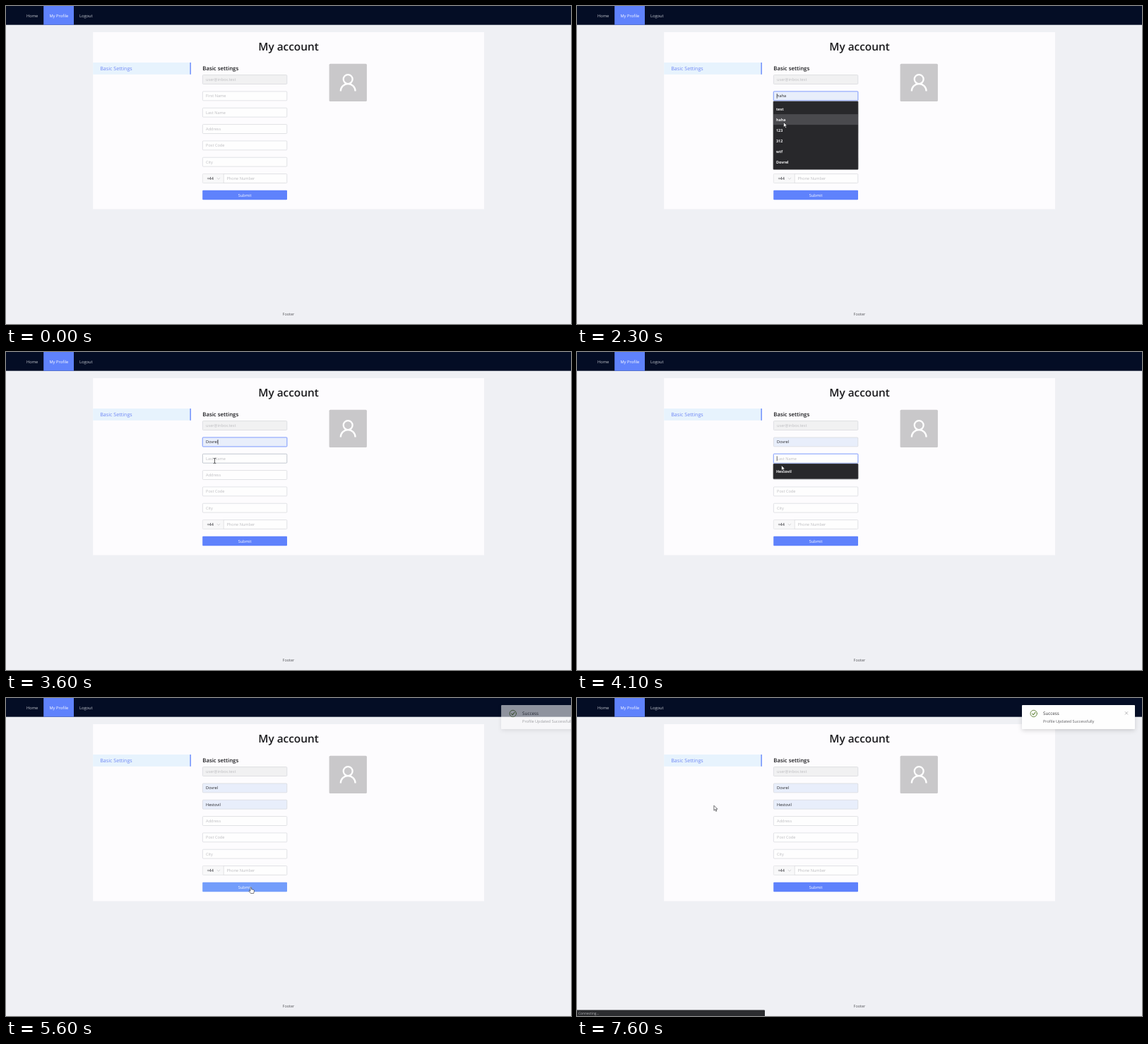
Write an HTML page that moves like this. It is 800 px wide and 450 px high and loops after 8000 ms.

```html
<!DOCTYPE html>
<html lang="en">
<head>
<meta charset="utf-8">
<title>My account</title>
<style>
  html, body { margin: 0; width: 100%; height: 100%; overflow: hidden; background: #eff0f4; }
  svg { display: block; width: 100vw; height: 100vh; }
  text {
    font-family: "Open Sans", "Noto Sans", sans-serif;
    font-size: 5.6px;
    text-rendering: geometricPrecision;
    white-space: pre;
  }
  .nav { font-size: 5.75px; fill: #c3c7cf; }
  .mid { text-anchor: middle; }
  .semi { font-weight: 600; fill: #1b1b1e; }
  .hint { fill: #bdbdc0; }
  .dark { fill: #232327; }
  .item { font-size: 5.4px; font-weight: 700; fill: #f4f4f5; }
  .line { fill: none; stroke-linecap: round; stroke-linejoin: round; }
</style>
</head>
<body>
<svg id="stage" viewBox="0 0 800 450" preserveAspectRatio="none">
  <defs>
    <filter id="soft" x="-20%" y="-50%" width="140%" height="220%">
      <feDropShadow dx="0" dy="2" stdDeviation="3" flood-color="#000" flood-opacity=".16"/>
    </filter>
  </defs>

  <rect width="800" height="450" fill="#eff0f4"/>
  <rect width="800" height="26.7" fill="#040d25"/>
  <rect x="53.2" width="42.8" height="26.7" fill="#5f82fc"/>
  <text class="nav" x="29" y="15.6">Home</text>
  <text class="nav" x="61.4" y="15.6" style="fill:#fff">My Profile</text>
  <text class="nav" x="104" y="15.6">Logout</text>

  <rect x="123.2" y="37" width="553.7" height="250.5" fill="#fdfcfe"/>
  <text class="semi mid" x="400" y="62.6" style="font-size:15.4px">My account</text>
  <rect x="123.2" y="80" width="138.6" height="16.8" fill="#e7f3fd"/>
  <rect x="260.5" y="80" width="1.3" height="16.8" fill="#5f82fc"/>
  <text x="133.2" y="91.3" fill="#6f87f5" style="font-size:7.15px">Basic Settings</text>
  <text class="semi" x="278.3" y="90.8" style="font-size:7.75px">Basic settings</text>

  <rect x="457.6" y="81.7" width="53.3" height="53.3" rx="1.6" fill="#c9c8ca"/>
  <g fill="none" stroke="#fff" stroke-width="2.3">
    <circle cx="484.2" cy="103.6" r="6.45"/>
    <path d="M473.8 120.5a10.4 10.4 0 0 1 20.8 0"/>
  </g>

  <g id="fields"></g>

  <rect id="submit" x="278.2" y="260.8" width="119.8" height="13.4" rx="1"/>
  <text class="mid" x="338.1" y="269.6" fill="#fff">Submit</text>
  <text class="mid" x="400" y="437.5" fill="#57585c" style="font-size:5.5px">Footer</text>

  <g id="lists"></g>

  <g id="toast">
    <rect x="630" y="10" width="160" height="34" rx="1" fill="#fefefe" filter="url(#soft)"/>
    <g class="line" stroke="#6c8b45">
      <circle cx="646.7" cy="22" r="4.7" stroke-width="1"/>
      <path d="M644.6 22.1l1.5 1.7 2.8-3.5" stroke-width="1.1"/>
    </g>
    <text x="660" y="24.2" fill="#37373a" style="font-size:6.3px">Success</text>
    <text x="660" y="35" fill="#5d5d61" style="font-size:5.5px">Profile Updated Successfully</text>
    <path class="line" d="M776.2 19.6l3.6 3.6m0-3.6l-3.6 3.6" stroke="#8b8b8f" stroke-width=".6"/>
  </g>

  <g id="status">
    <path d="M0 441.4h265a1 1 0 0 1 1 1V450H0z" fill="#2b2c2f"/>
    <text x="2" y="447.7" fill="#b9babd" style="font-size:4.85px">Connecting...</text>
  </g>

  <g id="arrow">
    <path d="M0 0v7l1.6-1.5 1.2 2.6 1.2-.5-1.2-2.6h2.2z" fill="#fff" stroke="#26262a" stroke-width=".65" stroke-linejoin="round"/>
  </g>
  <g id="beam">
    <path class="line" d="M-1.4-3.6Q0-3.6 0-2.8Q0-3.6 1.4-3.6M0-2.8V2.8M-1.4 3.6Q0 3.6 0 2.8Q0 3.6 1.4 3.6" stroke="#2c2c30" stroke-width=".75"/>
  </g>
  <g id="hand">
    <path d="M-.8 5V.7Q0-.4.8.7V3.2L4.1 4Q4.9 4.3 4.7 5.4L3.9 9H-.2L-2.9 5.6Q-2.5 4.2-.8 5.8z" fill="#fff" stroke="#26262a" stroke-width=".6" stroke-linejoin="round"/>
  </g>
</svg>

<script>
const LOOP = 8000, STEP = 100;
const LEFT = 278.2, WIDTH = 119.8, TOP = 97.4, PITCH = 23.33, HIGH = 13.3, ROW = 15;
const BLUE = '#5f82fc';
const FIRST = 'Dovrel', LAST = 'Hestovil';
const $ = id => document.getElementById(id);

function add(parent, tag, attrs, text) {
  const el = document.createElementNS('http://www.w3.org/2000/svg', tag);
  for (const key in attrs) el.setAttribute(key, attrs[key]);
  if (text) el.textContent = text;
  parent.appendChild(el);
  return el;
}
const set = (el, attrs) => { for (const key in attrs) el.setAttribute(key, attrs[key]); };
const show = (el, on) => { el.style.display = on ? '' : 'none'; };
const clamp = v => Math.min(1, Math.max(0, v));
const ease = v => v * v * (3 - 2 * v);

// Form fields
const labels = ['user@inbox.test', 'First Name', 'Last Name', 'Address', 'Post Code', 'City', 'Phone Number'];
const fields = labels.map((hint, i) => {
  const y = TOP + i * PITCH, phone = i === 6;
  const size = { x: LEFT + .2, y: y + .2, width: WIDTH - .4, height: HIGH - .4, rx: 1 };
  const ring = add($('fields'), 'rect', { ...size, fill: 'none', stroke: BLUE, 'stroke-opacity': .22, 'stroke-width': 2 });
  const box = add($('fields'), 'rect', { ...size, 'stroke-width': .65 });
  if (phone) {
    add($('fields'), 'rect', { x: LEFT + .5, y: y + .5, width: 29.4, height: HIGH - 1, fill: '#f8f8f9' });
    add($('fields'), 'path', { d: `M308.2 ${y + .3}v${HIGH - .6}`, stroke: '#d5d5d9', 'stroke-width': .65 });
    add($('fields'), 'text', { class: 'dark', x: 284.4, y: y + 8.7 }, '+44');
    add($('fields'), 'path', { class: 'line', d: `M299 ${y + 5.9}l1.9 2 1.9-2`, stroke: '#bcbcc0', 'stroke-width': .6 });
  }
  const text = add($('fields'), 'text', { class: 'hint', x: phone ? 312.5 : 283.1, y: y + 8.7 }, hint);
  const caret = add($('fields'), 'path', { stroke: '#17171a', 'stroke-width': .6 });
  const squiggle = add($('fields'), 'path', { stroke: '#c58d8d', 'stroke-width': .5, 'stroke-dasharray': '.8 .4' });
  return { hint, y, ring, box, text, caret, squiggle };
});

// Suggestion lists below the two name fields
function makeList(y, names) {
  const g = add($('lists'), 'g', {});
  add(g, 'rect', { x: 277.8, y, width: 120.4, height: names.length * ROW + 6.8, rx: 1, fill: '#28282b', stroke: '#77787c', 'stroke-width': .4 });
  const bar = add(g, 'rect', { x: 278, width: 120, height: ROW, fill: '#4a4a4e' });
  names.forEach((n, i) => add(g, 'text', { class: 'item', x: 282, y: y + 12.8 + i * ROW }, n));
  return { g, bar, y: y + 3.4, names };
}
const lists = [
  { ...makeList(134.7, ['test', 'haha', '123', '312', 'wtf', FIRST]), field: 1, from: 1600, to: 3200 },
  { ...makeList(158, [LAST]), field: 2, from: 3900, to: 4400 }
];

// Pointer path: time, x, y
const path = [
  [100, 683, 190], [900, 250, 146], [1000, 246, 138], [1200, 294, 126], [1300, 297, 125.5],
  [2100, 297, 126], [2300, 292.5, 164.5], [2400, 292, 168.5], [2900, 292, 217], [3200, 292, 217],
  [3500, 295, 156], [3600, 295.5, 154], [4000, 295, 153], [4200, 284, 168], [4500, 281, 169],
  [4900, 428, 254], [5000, 424, 260], [5300, 350, 267.5], [5800, 345, 267.5],
  [6150, 645, 74], [6450, 218, 97], [6600, 232.3, 104.7], [6700, 232.3, 104.7],
  [7300, 193.9, 152.2], [8000, 193.9, 152.2]
];
function pointer(t) {
  const i = Math.max(1, path.findIndex(p => p[0] >= t));
  const [t0, x0, y0] = path[i - 1], [t1, x1, y1] = path[i];
  const k = ease(clamp((t - t0) / (t1 - t0)));
  return { x: x0 + (x1 - x0) * k, y: y0 + (y1 - y0) * k };
}

const openList = t => lists.find(l => t >= l.from && t < l.to);
const pickRow = (list, p) => {
  const i = Math.floor((p.y - list.y) / ROW);
  return i >= 0 && i < list.names.length ? i : -1;
};
function hovered(t) {
  if (t < 100) return -1;
  const p = pointer(t), list = openList(t);
  if (list && p.y >= list.y - 3) return -1;
  const i = Math.floor((p.y - TOP) / PITCH);
  const inside = p.x >= LEFT && p.x <= LEFT + WIDTH && p.y - TOP - i * PITCH <= HIGH;
  return inside ? i : -1;
}

const focusAt = t => t < 1500 ? 0 : t < 3800 ? 1 : t < 5400 ? 2 : 0;
const mix = (a, b, k) => `rgb(${a.map((v, i) => Math.round(v + (b[i] - v) * k))})`;

function render(t) {
  const p = pointer(t), list = openList(t), focus = focusAt(t);
  const values = { 1: t >= 3200 ? FIRST : '', 2: t >= 4400 ? LAST : '' };

  lists.forEach(l => {
    show(l.g, l === list);
    if (l !== list) return;
    const row = pickRow(l, p);
    show(l.bar, row >= 0);
    if (row >= 0) {
      l.bar.setAttribute('y', l.y + row * ROW);
      values[l.field] = l.names[row];
    }
  });

  const over = hovered(Math.max(0, t - STEP));
  fields.forEach((f, i) => {
    const value = values[i] || '', focused = i > 0 && i === focus;
    const hover = i > 0 && i < 7 && i === over;
    show(f.ring, focused);
    set(f.box, {
      fill: i === 0 ? '#f1f1f2' : value ? '#e8eefb' : '#fefefe',
      stroke: focused ? BLUE : hover ? '#a5acb9' : '#d3d4d9'
    });
    f.text.textContent = value || f.hint;
    f.text.setAttribute('class', value ? 'dark' : 'hint');

    const blink = t < 1900 || t >= 2000;
    show(f.caret, focused && blink);
    const wide = focused && value ? f.text.getComputedTextLength() : 0;
    const cx = 283.2 + (list ? 0 : wide);
    if (focused) f.caret.setAttribute('d', `M${cx} ${f.y + 3.2}v7`);
    const marked = i === 2 && focused && !list && value;
    show(f.squiggle, marked);
    if (marked) f.squiggle.setAttribute('d', `M283.2 ${f.y + 10}h${wide}`);
  });

  const lit = clamp((t - 5100) / 300) * (1 - clamp((t - 6900) / 400));
  $('submit').setAttribute('fill', mix([95, 130, 252], [115, 157, 251], lit));

  const slide = 1 - (1 - clamp((t - 5500) / 300)) ** 2;
  show($('toast'), slide > 0);
  set($('toast'), { transform: `translate(${160 * (1 - slide)} 0)`, opacity: slide });
  show($('status'), t >= 7600);

  const at = hovered(t);
  const kind = at === 7 ? 'hand' : at > 0 ? 'beam' : 'arrow';
  ['arrow', 'beam', 'hand'].forEach(id => show($(id), t >= 100 && id === kind));
  $(kind).setAttribute('transform', `translate(${p.x} ${p.y})`);
}

let start;
function tick(now) {
  if (start === undefined) start = now;
  const t = (now - start) % LOOP;
  render(Math.floor(t / STEP) * STEP);
  requestAnimationFrame(tick);
}
render(0);
requestAnimationFrame(tick);
</script>
</body>
</html>
```
